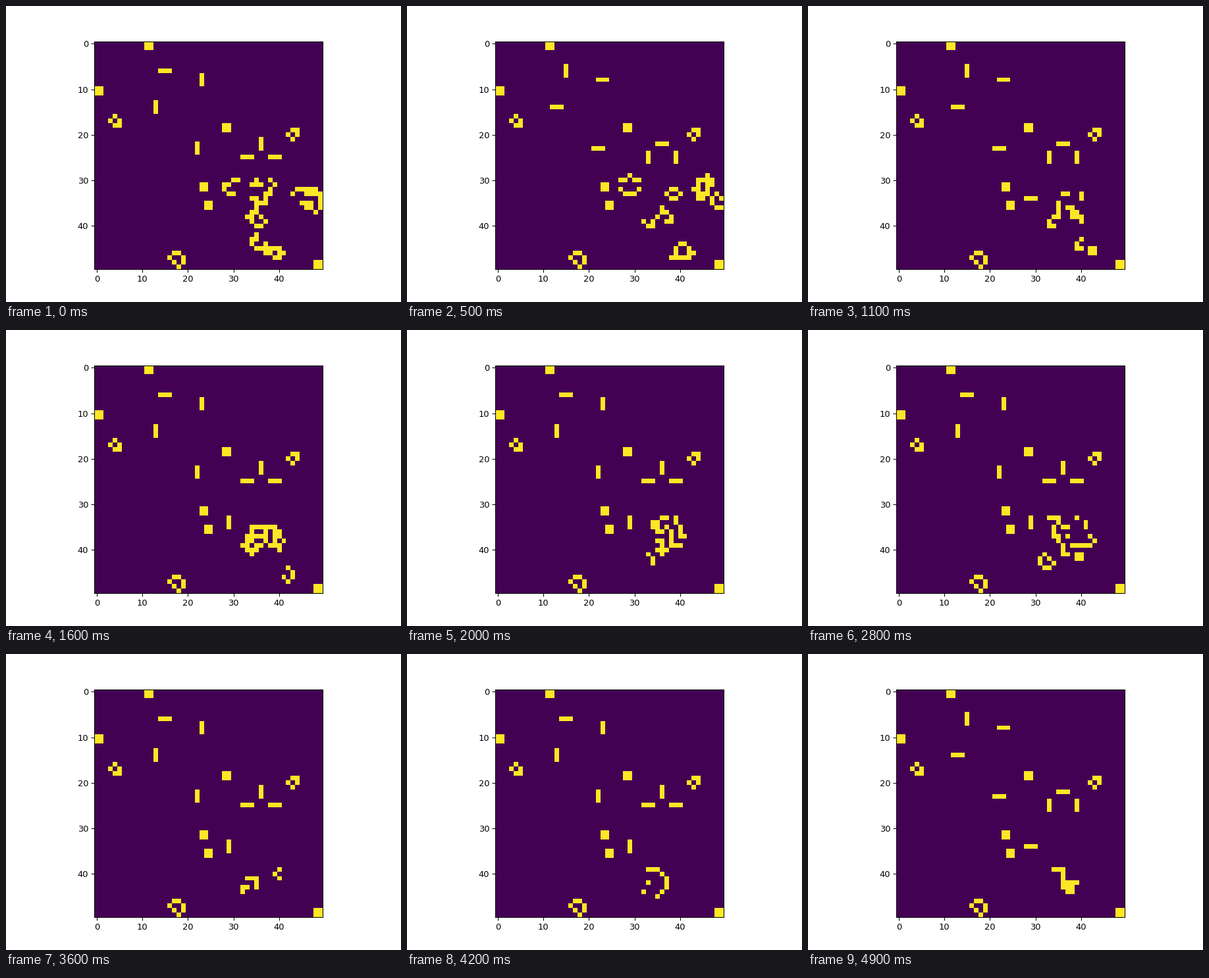
These frames come from a looping animation (600x450 px, 5000 ms). A matplotlib script:

```python
import numpy as np
import matplotlib.pyplot as plt
from matplotlib.animation import FuncAnimation

SIZE = 50
FRAMES = 50
INTERVAL = 100

BLOCK = ["OO", "OO"]
ROW = ["OOO"]
COLUMN = ["O", "O", "O"]
LOAF = [".OO.", "O..O", ".O.O", "..O."]

CLUSTERS = [
    (30, 28, ["..OO", "OO..", "O...", ".OO."]),
    (30, 33, ["..O..O.",
              ".OOO..O",
              ".....O.",
              "....OO.",
              ".OO.O..",
              "..OOO..",
              "..O....",
              ".OO....",
              "OO.O...",
              ".O..O..",
              "..OO..."]),
    (42, 34, [".O......",
              "OO......",
              "O..O....",
              ".OOOOOO.",
              "...OO.OO",
              ".....OO."]),
    (32, 43, [".OOOOO.",
              "O..OOOO",
              "......O",
              "..OOO.O",
              "...OO.O",
              ".....O."]),
]


def stamp(grid, row, col, pattern):
    for r, line in enumerate(pattern):
        for c, char in enumerate(line):
            if char == "O":
                grid[row + r, col + c] = 1


def first_generation():
    grid = np.zeros((SIZE, SIZE), dtype=int)
    for row, col in [(0, 11), (10, 0), (18, 28), (31, 23), (35, 24), (48, 48)]:
        stamp(grid, row, col, BLOCK)
    for row, col in [(6, 14), (25, 32), (25, 38)]:
        stamp(grid, row, col, ROW)
    for row, col in [(7, 23), (13, 13), (22, 22), (21, 36)]:
        stamp(grid, row, col, COLUMN)
    stamp(grid, 16, 3, [".O.", "O.O", ".OO"])
    stamp(grid, 19, 42, [".OO", "O.O", ".O."])
    stamp(grid, 46, 16, LOAF)
    for row, col, pattern in CLUSTERS:
        stamp(grid, row, col, pattern)
    return grid


def step(grid):
    """One Game of Life generation; cells beyond the edge are dead."""
    padded = np.pad(grid, 1)
    total = sum(padded[r:r + SIZE, c:c + SIZE]
                for r in range(3) for c in range(3))
    return ((total == 3) | ((total == 4) & (grid == 1))).astype(int)


generations = [first_generation()]
while len(generations) < FRAMES:
    generations.append(step(generations[-1]))

fig, ax = plt.subplots(figsize=(6.4, 4.8), dpi=93.75)
# Keeps the bottom spine on the same pixel row as the image edge.
fig.subplots_adjust(bottom=0.1105)
image = ax.imshow(generations[0], cmap="viridis", vmin=0, vmax=1,
                  interpolation="nearest")


def update(frame):
    image.set_data(generations[frame])
    return [image]


animation = FuncAnimation(fig, update, frames=FRAMES, interval=INTERVAL,
                          repeat=True)
plt.show()
```
